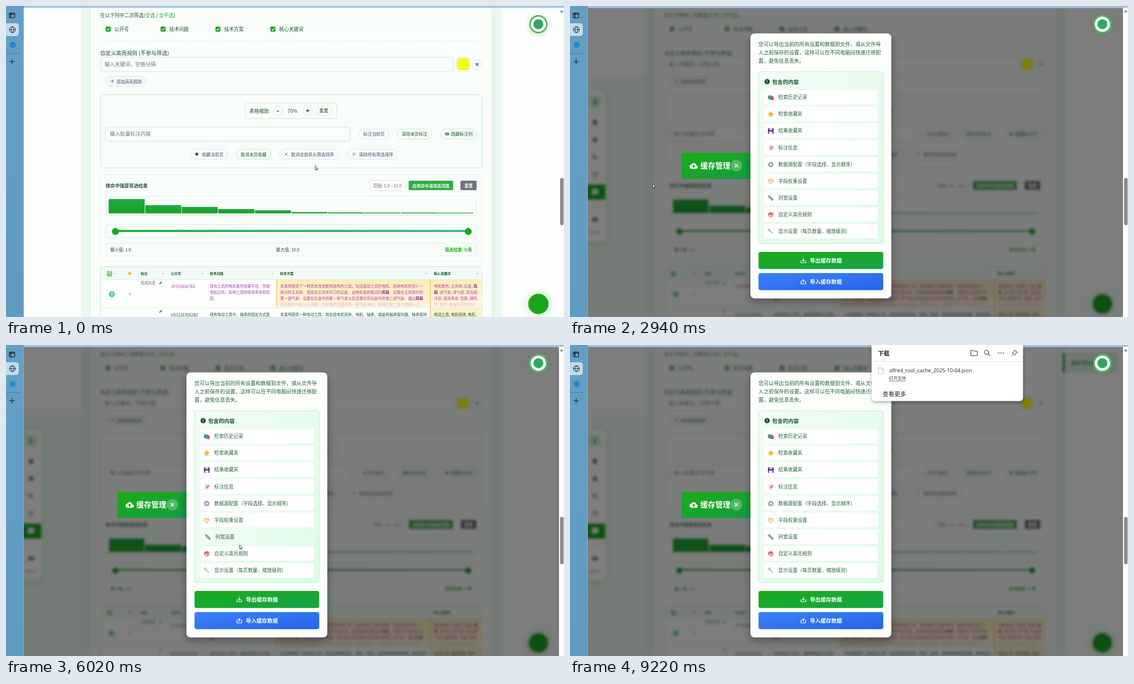
An HTML page for the animation above (9.8 s loop, 1002 by 559 pixels).

```html
<!DOCTYPE html>
<html lang="zh">
<head>
<meta charset="utf-8">
<title>缓存管理</title>
<style>
html,body{margin:0;width:100%;height:100%;overflow:hidden;background:#fff}
svg{display:block;width:1002px;height:559px;font-family:'Noto Sans CJK SC','Noto Sans CJK',sans-serif}
</style>
</head>
<body>
<svg id="stage" viewBox="0 0 1002 559" xmlns="http://www.w3.org/2000/svg"></svg>
<script>
const LOOP = 9800;
const INK = '#14532d', GREEN = '#1aad19', LINE = '#c6ead2', SLATE = '#3b4a75';

// ---- drawing helpers (text y is the visual middle) ----
const text = (x, y, s, size, fill = INK, extra = '') =>
  `<text x="${x}" y="${y + size * .37}" font-size="${size}" fill="${fill}" ${extra}>${s}</text>`;
const bold = (x, y, s, size, fill, extra = '') => text(x, y, s, size, fill, 'font-weight="700" ' + extra);
const med = (x, y, s, size, fill) => text(x, y, s, size, fill, 'font-weight="500"');
const box = (x1, y1, x2, y2, r, fill, stroke, extra = '') =>
  `<rect x="${x1}" y="${y1}" width="${x2 - x1}" height="${y2 - y1}" rx="${r}" fill="${fill}" ${stroke ? `stroke="${stroke}"` : ''} ${extra}/>`;
const dot = (x, y, r, fill, extra = '') => `<circle cx="${x}" cy="${y}" r="${r}" fill="${fill}" ${extra}/>`;
const line = (d, stroke, w = 1, extra = '') =>
  `<path d="${d}" fill="none" stroke="${stroke}" stroke-width="${w}" ${extra}/>`;
const icon = (d, x, y, size, fill) =>
  `<path d="${d}" fill="${fill}" transform="translate(${x - size / 2} ${y - size / 2}) scale(${size / 24})"/>`;
const cross = (x, y, r, c, w) => line(`M${x - r} ${y - r}l${2 * r} ${2 * r}m0 ${-2 * r}l${-2 * r} ${2 * r}`, c, w);
const plus = (x, y, r, c, w) => line(`M${x - r} ${y}h${2 * r}M${x} ${y - r}v${2 * r}`, c, w);
const star = (x, y, r, fill) => {
  const pts = [...Array(10)].map((_, i) => {
    const a = i * Math.PI / 5 - Math.PI / 2, q = i % 2 ? r * .48 : r;
    return (x + q * Math.cos(a)).toFixed(2) + ',' + (y + q * Math.sin(a)).toFixed(2);
  });
  return `<polygon points="${pts.join(' ')}" fill="${fill}"/>`;
};
const gear = (x, y, r, c) =>
  dot(x, y, r * .62, 'none', `stroke="${c}" stroke-width="${r * .5}"`) +
  dot(x, y, r * .92, 'none', `stroke="${c}" stroke-width="${r * .3}" stroke-dasharray="${r * .36}"`);
const lens = (x, y, r, c, w) => dot(x - r * .2, y - r * .2, r * .7, 'none', `stroke="${c}" stroke-width="${w}"`) +
  line(`M${x + r * .3} ${y + r * .3}l${r * .7} ${r * .7}`, c, w);
const pill = (x1, x2, y, fill = '#f9fdfa', stroke = '#d3ecdc') => box(x1, y - 9, x2, y + 9, 9, fill, stroke);
const grad = (id, a, b, dir = 'x2="1" y2="1"') =>
  `<linearGradient id="${id}" ${dir}><stop stop-color="${a}"/><stop offset="1" stop-color="${b}"/></linearGradient>`;
const blur = (id, s) => `<filter id="${id}" x="-60%" y="-60%" width="220%" height="220%"><feGaussianBlur stdDeviation="${s}"/></filter>`;

const CLOUD = 'M19.35 10.04C18.67 6.59 15.64 4 12 4 9.11 4 6.6 5.64 5.35 8.04 2.34 8.36 0 10.91 0 14c0 3.31 2.69 6 6 6h13c2.76 0 5-2.24 5-5 0-2.64-2.05-4.78-4.65-4.96zM14 13v4h-4v-4H7l5-5 5 5h-3z';
const WALK = 'M13.5 5.5c1.1 0 2-.9 2-2s-.9-2-2-2-2 .9-2 2 .9 2 2 2zM9.8 8.9L7 23h2.1l1.8-8 2.1 2v6h2v-7.5l-2.1-2 .6-3C14.8 12 16.8 13 19 13v-2c-1.9 0-3.5-1-4.3-2.4l-1-1.6c-.4-.6-1-1-1.7-1-.3 0-.5.1-.8.1L6 8.3V13h2V9.6z';
const CHAT = 'M20 2H4c-1.1 0-2 .9-2 2v18l4-4h14c1.1 0 2-.9 2-2V4c0-1.1-.9-2-2-2z';
const EYE = 'M12 4.5C7 4.5 2.7 7.6 1 12c1.7 4.4 6 7.5 11 7.5s9.3-3.1 11-7.5C21.3 7.6 17 4.5 12 4.5z';
const FILE = 'M14 2H6C4.9 2 4 2.9 4 4v16c0 1.1.9 2 2 2h12c1.1 0 2-.9 2-2V8z';

// ---- page ----
function filters() {
  let s = text(169, 16.5, `在以下列中二次筛选(<tspan fill="${GREEN}">全选</tspan> / <tspan fill="${GREEN}">全不选</tspan>)`, 8.7, INK, 'font-weight="500"');
  ['公开号', '技术问题', '技术方案', '核心关键词'].forEach((n, i) => {
    const x = 179 + i * 98.6;
    s += box(x, 37, x + 9, 46, 1.5, '#16a01c') + line(`M${x + 2} 41.6l2 2 3.3-4.2`, '#fff', 1.3) + text(x + 15.7, 42, n, 8.7);
  });
  s += line('M169 63.5H855', '#d5e8dc', 1, 'stroke-dasharray="2 1"');
  s += text(169, 84.5, '自定义高亮规则 (不参与筛选)', 9.6);
  s += box(169.5, 92, 803.5, 118, 5, '#fbfefc', LINE) + text(177, 104.5, '输入关键词，空格分隔', 9.2, '#6b7280');
  s += box(808.5, 92.5, 833, 118, 5, '#fff', '#dcebe1') + box(811, 95, 830.5, 114.5, 2, '#ffff00', '#e2e200');
  s += dot(846, 105, 8.8, '#fbfefc', `stroke="${LINE}"`) + cross(846, 104.7, 2.4, '#1f2937', 1.1);
  s += pill(179, 252, 135.5, '#f4faf6') + plus(191, 135, 2.8, SLATE, .9) + med(198, 136, '添加高亮规则', 7.7, SLATE);
  return s;
}
function tools() {
  let s = box(169.5, 159.5, 855, 291, 5, '#f8fdf9', LINE) + box(430, 174.5, 594, 202, 3, '#fbfefc', LINE);
  s += med(437, 188.5, '表格缩放:', 8.7);
  s += dot(488, 188.5, 8.5, '#fbfefc', `stroke="${LINE}"`) + line('M486.2 189h3.6', INK, 1.3);
  s += text(505.5, 188.5, '70%', 8.7);
  s += dot(541.7, 188, 8.5, '#fbfefc', `stroke="${LINE}"`) + plus(541.7, 188, 3, INK, 1.4);
  s += pill(555, 586, 188) + med(562.5, 188, '重置', 8.1);
  s += box(178.5, 217.5, 617.5, 243, 5, '#fbfefc', LINE) + text(186.5, 230, '输入批量标注内容', 9.2, '#6b7280');
  s += pill(633.5, 688, 230) + med(641.5, 230.5, '标注当前页', 7.7, SLATE);
  s += pill(703, 765, 230, '#f9fdfa', LINE) + med(710.5, 230.5, '清除本页标注', 7.7);
  s += pill(780, 846, 230, '#f9fdfa', LINE) + icon(EYE, 792, 230, 8.5, INK) + dot(792, 230, 1.9, '#fff') + dot(792, 230, 1.1, INK) + med(799, 230.5, '隐藏标注列', 7.8);
  s += pill(331, 398, 266.5) + star(342.5, 266.3, 4, '#2f3d63') + med(352, 267, '收藏当前页', 7.7, SLATE);
  s += pill(413.5, 475.5, 266.5, '#f9fdfa', LINE) + med(421.5, 267, '取消本页收藏', 7.7);
  s += pill(491, 597, 266.5) + cross(503, 266.3, 2.3, SLATE, .9) + med(512, 267, '取消全部表头筛选排序', 7.7, SLATE);
  s += pill(612.5, 703, 266.5) + cross(624.5, 266.3, 2.3, SLATE, .9) + med(634, 267, '清除所有筛选排序', 7.7, SLATE);
  return s;
}
function strength() {
  let s = box(169.5, 303.5, 855, 460, 5, '#f9fdfa', '#e8f3ec') + bold(179, 323, '按命中强度筛选结果', 8.4, '#24503a');
  s += box(653.5, 313.5, 716, 332, 3, '#fbfdfc', '#dfe9e3') + text(659, 323, '范围: 1.0 - 10.0', 7.8, '#6b7280');
  s += box(723, 314, 803, 331, 2, '#35ad45') + bold(730, 322.8, '应用命中该筛选范围', 7.35, '#fff');
  s += box(816, 314, 845, 331, 2, '#6c757d') + bold(823, 322.8, '重置', 7.6, '#fff');
  for (const [a, b] of [[342, 377], [392.5, 416], [426, 449.5]]) s += box(179.5, a, 844.5, b, 4, '#f9fdfa', '#deeee4');
  [25.5, 14.5, 11.5, 7.5, 5.3, 2.2, 1.6, 1.3, 1.2, 1.1].forEach((h, i) => {
    const x = 184.3 + i * 65.62;
    s += box(x, 372.5 - h, x + 64.8, 372.7, Math.min(1, h / 3), 'url(#bar)');
  });
  s += box(190, 402.4, 836, 406.2, 2, 'url(#track)') + dot(196.5, 405.3, 6.2, '#18a81e') + dot(830, 405.3, 6.2, '#18a81e');
  s += text(187, 438, '最小值: 1.0', 7.7) + text(485, 438, '最大值: 10.0', 7.7) + bold(837, 438, '筛选结果: 0 条', 7.7, GREEN, 'text-anchor="end"');
  return s;
}
function table() {
  const P = '#b23cb0', fan = '<tspan font-weight="700" fill="#7a1f7a">';
  const rows = (x, lines, y0 = 504) => lines.map((l, i) => text(x, y0 + i * 11, l, 6.75, P, i == 3 ? 'opacity=".35"' : '')).join('');
  let s = box(169.5, 468.5, 855, 570, 3, '#fbfefc', LINE) + box(170, 469, 854.5, 491, 2, '#f2fbf5') + line('M169.5 491.5H855M169.5 542.5H855', '#dcefe3');
  s += box(486, 492, 855, 542, 0, 'url(#cream)') + box(762, 543, 855, 559, 0, '#fdf0c9');
  s += line('M486 492v50M762 492v67', '#e5a93c', .9);
  s += bold(181, 477.8, '命中', 5, GREEN) + bold(181, 483.6, '强度', 5, GREEN) + star(222.3, 480.5, 4, '#f0b323');
  [[242, '标注'], [296, '公开号'], [366, '技术问题'], [492, '技术方案'], [768, '核心关键词']].forEach(([x, n]) => s += bold(x, 480.5, n, 6.1, INK));
  [195, 281.5, 352, 478, 754, 846.5].forEach(x => s += `<path d="M${x - 1.8} 479.8h3.6l-1.8 2.4z" fill="#b6c6bd"/>`);
  s += text(242, 498, '低相关度', 6.7, '#6b7280');
  [498, 549].forEach(y => s += line(`M275.6 ${y + 2}l4-4`, INK, 1.6));
  s += dot(190, 518, 5.5, '#5ccbb9') + bold(190, 518, '3', 5.5, '#fff', 'text-anchor="middle"') + star(222.3, 517.5, 3.5, '#cfd3d6');
  s += text(296, 504, 'JP7658067B2', 7, P);
  s += rows(366, ['现有工具的电机散热效果不佳，导致', '电机过热，影响工具的使用寿命和性', '能。']);
  s += rows(492.5, ['本发明提供了一种具有改进散热结构的工具，包括驱动工具的电机、容纳电机的至少一',
    `部分的主壳体、连接到主壳体开口的后盖、由电机旋转驱动的${fan}风扇</tspan>、设置在主体部中的`,
    `第一进气部、设置在后盖中的第一排气部以及设置在突出部中的第二进气部。通过${fan}风扇</tspan>`,
    '将外部空气吸入主体部，冷却电机后通过第一排气部排出，再通过第二进气部进入主']);
  s += rows(768.5, [`电机散热, 主壳体, 后盖, ${fan}风</tspan>`, `${fan}扇</tspan>, 进气部, 排气部, 突出部,`, '冷却, 使用寿命, 性能, 弹性', '体, 密封, 电池组连接部分']);
  s += text(296, 555, 'US12263562B2', 7) + text(366, 555, '现有电动工具中，轴承的固定方式复', 6.75);
  s += text(492.5, 555, '本发明提供一种电动工具，其包括电机壳体、电机、轴承、端盖和轴承保持器。轴承保持', 6.75) + med(768.5, 555, '电动工具, 电机壳体, 电机,', 6.75);
  return s;
}
const tip = (id, y, s) => `<g id="${id}">${box(68.5, y - 9.5, 110, y + 9.5, 4, '#22b14c')}${bold(76, y, s, 6.6, '#fff')}</g>`;
function drawer() {
  let s = box(20, 153, 64, 428, 9, '#1aad19', '', 'opacity=".22" filter="url(#soft)"') + box(20, 151.5, 64, 423.5, 9, '#fff');
  s += box(34, 161, 55.5, 183, 5, '#d2f4dc') + icon(WALK, 45, 172, 14, '#17a325');
  s += icon(FILE, 45, 209, 11, INK) + plus(45, 210.3, 1.7, '#fff', 1);
  s += gear(45, 240.5, 4.6, INK) + lens(44.6, 271.5, 4.4, INK, 1.3);
  s += dot(45, 303, 4.5, 'none', `stroke="${INK}" stroke-width="1.1"`) + line('M45 300.4v2.8l1.9 1.2', INK);
  s += box(28, 320, 64, 349, 4, '#17ab1d') + icon(CHAT, 45, 334.5, 12, '#fff');
  [42.4, 45, 47.6].forEach(x => s += dot(x, 333.2, .8, '#17ab1d'));
  s += line('M33 361.5H56', '#cbe5d4') + icon(CLOUD, 45, 383.3, 12, INK) + text(45, 407, 'v25.2.1', 6, INK, 'text-anchor="middle"');
  return s;
}
const toast = box(884, 14, 984, 50, 4, '#dcf3e2') + box(884, 14, 889, 50, 2, '#1f9d3a') + bold(900, 33, '缓存导出成功', 8.7, '#1f9d3a');
const page = box(32, 3, 993, 559, 0, '#fbfefc') + '<rect id="tint" x="32" y="126" width="103" height="433" fill="#eefbf2"/>' +
  box(135, 3, 151, 559, 0, '#e9f8ee') + box(873, 3, 889.5, 559, 0, '#e9f8ee') + box(151, 3, 873, 559, 0, '#fafefb') +
  line('M151 3V559M873 3V559', '#cfeeda') + filters() + tools() + strength() + table() +
  dot(956, 535.5, 19, '#1aad19', 'opacity=".3" filter="url(#soft)"') + dot(956, 535.5, 18.2, '#18a61b') +
  `<g id="drawer">${drawer()}</g>` + tip('tip1', 341, '检索结果') + tip('tip2', 388, '缓存管理') + `<g id="toast">${toast}</g>`;

// ---- modal ----
const emoji = [
  '<path d="M-5-3l4-1.5v8l-4-1z" fill="#2fa34a"/><path d="M-1-3.6h3v8h-3z" fill="#3b7ddd"/><path d="M2-2.5l3 .8v7l-3-1z" fill="#d8433f"/>',
  star(0, 0, 6, '#f5b921'),
  box(-5, -5, 5, 5, 1, '#51307d') + box(-2.6, -5, 2.6, -1.4, 0, '#d8d2e6') + box(-3, 1, 3, 5, 0, '#fff'),
  box(-3.5, -4.5, 3.5, 5, .6, '#e3dde8') + line('M-2-2h4M-2 0h4M-2 2h3', '#a48fb0', .7) + line('M0 2.5L4.5-2.5', '#e2553d', 1.7),
  gear(0, 0, 5, '#a3a0b5'),
  line('M0-4.5v8M-4.5-2.5h9M-3 4h6', '#d99b3c', .9) + line('M-5.5 1q1.5 2 3 0l-1.5-3.5zM2.5 1q1.5 2 3 0l-1.5-3.5z', '#d99b3c', .7),
  '<g transform="rotate(45)">' + box(-6, -2, 6, 2, .5, '#a7a3b5') + line('M-4-2v2M-2-2v1.5M0-2v2M2-2v1.5M4-2v2', '#6f6b80', .6) + '</g>',
  dot(0, 0, 5, '#e88a83') + dot(-2, -1.8, 1.2, '#c2353f') + dot(1.6, -2, 1.1, '#5b74c9') + dot(2.3, 1.3, 1.1, '#f1c84b') + dot(-1.4, 2, 1.3, '#fff'),
  line('M-3.2-3.2L3.8 3.8', '#b4b2bf', 1.7) + dot(-3, -3, 1.7, 'none', 'stroke="#b4b2bf" stroke-width="1.2"')
];
const items = ['检索历史记录', '检索收藏夹', '结果收藏夹', '标注信息', '数据源配置（字段选择、显示顺序）', '字段权重设置', '列宽设置', '自定义高亮规则', '显示设置（每页数量、缩放级别）'];
const rowY = i => 164 + i * 30.1;
const button = (id, y, fill, over, mark, label) =>
  `<g id="${id}">` + box(340, y + 3, 561, y + 33, 4, '#0b3d1c', '', `id="${id}S" filter="url(#near)"`) +
  box(338.5, y, 562.5, y + 30.7, 4, fill) + box(338.5, y, 562.5, y + 30.7, 4, over, '', `id="${id}H"`) +
  line(mark, '#fff', 1.2, `transform="translate(419 ${y + 15.5})"`) + bold(430.7, y + 15.7, label, 9.65, '#fff') + '</g>';
function modal() {
  let s = box(324, 49.5, 577, 525.5, 8, '#fdfffd');
  ['您可以导出当前的所有设置和数据到文件，或从文件导', '入之前保存的设置。这样可以在不同电脑间快速迁移配', '置，避免信息丢失。'].forEach((l, i) => s += text(338.5, 69 + i * 14.8, l, 9.16, '#1d6337'));
  s += box(338.8, 118, 562.3, 427, 4, 'url(#info)', '#bdeccd') + dot(354, 136, 4.7, INK) + line('M354 133.4v3.2m0 1.1v1.1', '#fff', 1.1) + bold(363, 136.3, '包含的内容', 9.6, INK);
  items.forEach((n, i) => s += `<g id="row${i}">${box(348.5, rowY(i) - 13, 553, rowY(i) + 13, 3, '#fff')}<g transform="translate(360.5 ${rowY(i) + .5})">${emoji[i]}</g>${text(374, rowY(i), n, 8.65, '#1d6337')}</g>`);
  s += button('exp', 442, 'url(#go)', 'url(#goDark)', 'M-4.2 0v4h8.4v-4M0-4.5v5.8M-2.2-.8L0 1.4 2.2-.8', '导出缓存数据');
  s += button('imp', 480, 'url(#sky)', 'url(#skyDark)', 'M-2.5-.5h-1.7v4.5h8.4v-4.5h-1.7M0 1.8v-5.2M-2-1.6L0-3.6 2-1.6', '导入缓存数据');
  return s;
}
const header = box(200, 264, 345, 311, 0, 'url(#head)') + icon(CLOUD, 222, 287.5, 15, '#fff') + bold(234, 287.5, '缓存管理', 13.5, '#fff') +
  dot(298.7, 287, 10.6, '#fff', 'fill-opacity=".25"') + cross(298.7, 287, 3, '#fff', 1.5);

// ---- browser chrome ----
const chrome = box(0, 0, 1002, 3.3, 0, '#a3c3dc') + box(0, 0, 32, 559, 0, 'url(#side)') + line('M31.6 5V559', '#8db8d4', .8) +
  box(-6, 31, 23, 54, 5, '#c3dae9') +
  box(6, 12.5, 15.5, 21.5, 1.5, 'none', '#15202a', 'stroke-width="1.2"') + line('M6 14.5h9.5M8.7 13v8.5', '#15202a', 1.5) +
  dot(11.5, 42.5, 5.3, 'none', 'stroke="#15202a"') + line('M6 42.5h11M11.5 37q-5 5.5 0 11M11.5 37q5 5.5 0 11', '#15202a', .8) +
  dot(12, 70, 5.5, '#2b86c8') + line('M0 85.3H24', '#3f7ba3', .9) + plus(11, 100, 5, '#15202a', 1.1) +
  box(993, 3.3, 1002, 559, 0, '#fcfcfc') + box(995, 309, 1001.3, 394, 3, '#8b8b8b') + '<path d="M994.5 11.5h6.6l-3.3-4.5z" fill="#8b8b8b"/>' +
  dot(956, 34, 18, '#1aad19', 'opacity=".25" filter="url(#near)"') + dot(956, 32.7, 16.3, '#fff') +
  dot(956, 32.7, 15, '#fff', 'stroke="#45ab55" stroke-width="2.4"') + dot(956, 32.7, 9, '#2fa860');
const G = '#333';
const popup = box(542, 0, 813.5, 103, 6, '#000', '', 'opacity=".35" filter="url(#near)"') + box(541.5, -8, 813.5, 100.7, 6, '#fff') +
  bold(553, 14.7, '下载', 10.3, '#222') + line('M719.8 9.5h4l1.5 1.7h6v8h-11.5z', G, 1, 'stroke-linejoin="round"') + lens(749, 14.3, 5.3, G, 1.1) +
  [770, 774, 778].map(x => dot(x, 14.5, 1, G)).join('') +
  line('M799 9l4.5 4.5-3 1.2-2.2 3.8-4.3-4.3 3.8-2.2zM796 16.5l-3 3', G, 1, 'stroke-linejoin="round"') + line('M542 29.7H813', '#e6e6e6') +
  line('M554 41h5.5l3 3v7.8h-8.5zM559.5 41v3h3', '#b9b9b9', .9) +
  `<text x="573" y="49.2" font-size="9.3" fill="#222" style="font-family:'Open Sans',sans-serif">alfred_tool_cache_2025-10-04.json</text>` +
  text(573, 60.5, '打开文件', 7.65, '#333') + line('M573 65.3h30.5', '#a06a50', .8) + med(561.5, 88.3, '查看更多', 10.5, '#222');
const pointers =
  `<path id="arrow" d="M0 0V7.4L1.8 6 2.9 8.4 3.9 8 2.8 5.6H5.1Z" fill="#fff" stroke="#222" stroke-width=".8"/>` +
  `<path id="beam" d="M-2-5h4M0-5V5M-2 5h4" fill="none" stroke="#222" stroke-width="1"/>` +
  `<path id="hand" d="M-.7 .6Q0-.4 .7 .6V4L4 4.8Q4.8 5.1 4.6 6.2L3.8 9.8H-.4L-2.6 6.4Q-2.4 5.4-.7 6.6Z" fill="#fff" stroke="#222" stroke-width=".7"/>`;

const svg = document.getElementById('stage');
svg.innerHTML = '<defs>' + grad('bar', '#1faa45', '#17a31f', 'x2="0" y2="1"') + grad('track', '#1aa92a', '#34b795', 'x2="1" y2="0"') +
  grad('cream', '#fdecb8', '#fdf6dd', 'x2="0" y2="1"') + grad('side', '#639fc4', '#609bc0', 'x2="0" y2="1"') +
  grad('info', '#f3fdf6', '#dcfbe6') + grad('go', '#1aad19', '#16a34a') + grad('goDark', '#16a34a', '#15803d') +
  grad('sky', '#3b82f6', '#2563eb') + grad('skyDark', '#2563eb', '#1d4ed8') + grad('head', '#1aad19', '#159a45') +
  blur('soft', 7) + blur('near', 3) +
  '<filter id="frost" filterUnits="userSpaceOnUse" x="0" y="0" width="1002" height="559"><feGaussianBlur id="haze" stdDeviation="0"/></filter>' +
  '<clipPath id="view"><path d="M32 3.3H993V559H32z"/></clipPath></defs>' +
  `<g clip-path="url(#view)"><g id="page">${page}</g><path id="dim" fill="#000" fill-rule="evenodd"/>` +
  `<g id="header">${header}</g><g id="modal">${box(322, 55, 579, 533, 10, '#000', '', 'id="shade" opacity=".3" filter="url(#soft)"')}${modal()}</g></g>` +
  chrome + `<g id="popup">${popup}</g><g id="cursor">${pointers}</g>`;

// ---- motion ----
const $ = {};
svg.querySelectorAll('[id]').forEach(e => $[e.id] = e);
const set = (id, o) => { for (const k in o) $[id].setAttribute(k, o[k]); };
const show = (id, a) => set(id, { opacity: a, visibility: a > 0 ? 'visible' : 'hidden' });
const ramp = (t, a, b) => Math.max(0, Math.min(1, (t - a) / (b - a)));

// bursts of picture changes: start, end, steps
const bursts = [[270, 1220, 8], [1340, 2100, 7], [2410, 3350, 8], [3490, 4450, 8], [4590, 5570, 8], [5720, 6650, 8], [6810, 6810, 1], [7390, 7930, 5], [8640, 9220, 5]];
function snap(t) {
  let now = 0;
  for (const [a, b, n] of bursts) {
    if (t < a) break;
    const d = n > 1 ? (b - a) / (n - 1) : 1;
    now = a + d * Math.min(n - 1, Math.floor((t - a) / d + .1));
  }
  return now;
}
const path = [[140, 555, 287], [541, 400, 299], [813, 200, 312], [1084, 56, 328], [1300, 50, 338], [1470, 49.5, 362], [1850, 49, 379], [2700, 48.5, 380],
  [2810, 60, 372], [3350, 408, 166], [3740, 410, 180], [3890, 410, 192], [4450, 410, 232], [4590, 410, 243], [4780, 410, 272], [5110, 409.5, 297], [5150, 409.5, 300],
  [5570, 411, 325], [5720, 413, 334], [6500, 432, 408], [6650, 443, 446], [6810, 447, 463], [8500, 447, 463], [9075, 826, 540]];
function at(t) {
  const i = path.findIndex(k => k[0] > t);
  if (i < 0) return path[path.length - 1].slice(1);
  if (!i) return path[0].slice(1);
  const [a, b] = [path[i - 1], path[i]], q = (t - a[0]) / (b[0] - a[0]);
  return [a[1] + (b[1] - a[1]) * q, a[2] + (b[2] - a[2]) * q];
}
const over = (t, x1, x2, y1, y2) => { const [x, y] = at(t); return t > 2900 && x > x1 && x < x2 && y > y1 && y < y2; };
// hover transition: share of the last 300 ms spent inside
const hover = (t, ...r) => [...Array(13)].reduce((s, _, i) => s + over(t - i * 25, ...r), 0) / 13;

function draw(time) {
  const t = snap(time), p = ramp(t, 2410, 2800), slide = ramp(t, 680, 1084);
  show('tint', slide);
  show('drawer', slide);
  set('drawer', { transform: `translate(${-36 * (1 - slide) ** 2} 0)` });
  show('tip1', ramp(t, 1000, 1220) - ramp(t, 1340, 1570));
  show('tip2', ramp(t, 1600, 1850) - ramp(t, 2410, 2700));
  const dx = -38 * (1 - p);
  set('haze', { stdDeviation: 1.9 * p ** 4 });
  if (p) $.page.setAttribute('filter', 'url(#frost)'); else $.page.removeAttribute('filter');
  show('dim', .505 * p);
  set('dim', { d: `M32 3H993V559H32zM${332 + dx} 49.5h237q8 0 8 8v460q0 8-8 8h-237q-8 0-8-8v-460q0-8 8-8z` });
  show('header', p);
  show('modal', p);
  set('modal', { transform: `translate(${dx} 0)` });
  set('shade', { opacity: p < 1 ? 0 : .28 });
  items.forEach((_, i) => {
    const h = hover(t, 348, 553, rowY(i) - 13, rowY(i) + 13);
    set('row' + i, { transform: `translate(${2 * h} 0)` });
    $['row' + i].firstChild.setAttribute('fill-opacity', 1 - .9 * h);
  });
  [['exp', 442], ['imp', 480]].forEach(([id, y]) => {
    const h = t > 9200 ? 0 : hover(t, 338, 563, y, y + 31);
    set(id, { transform: `translate(0 ${-1.2 * h})` });
    show(id + 'H', h);
    show(id + 'S', .3 * h);
  });
  const drop = ramp(t, 7300, 7525), note = ramp(t, 7390, 7800);
  show('popup', t < 7390 ? 0 : drop);
  show('toast', note);
  set('toast', { transform: `translate(${110 * (1 - note) ** 2} 0)` });

  const [x, y] = at(t);
  const onRow = p == 1 && items.some((_, i) => over(t, 348, 553, rowY(i) - 13, rowY(i) + 13));
  const onBtn = over(t, 338, 563, 442, 473) || over(t, 338, 563, 480, 511) || (t > 1000 && t < 1340) || (t > 1700 && t < 2500);
  show('beam', +onRow);
  show('hand', +(!onRow && onBtn));
  show('arrow', +(!onRow && !onBtn));
  set('cursor', { transform: `translate(${x} ${y})`, display: t > 9200 ? 'none' : 'inline' });
}
const start = performance.now();
(function tick() {
  draw((performance.now() - start) % LOOP);
  requestAnimationFrame(tick);
})();
</script>
</body>
</html>
```
